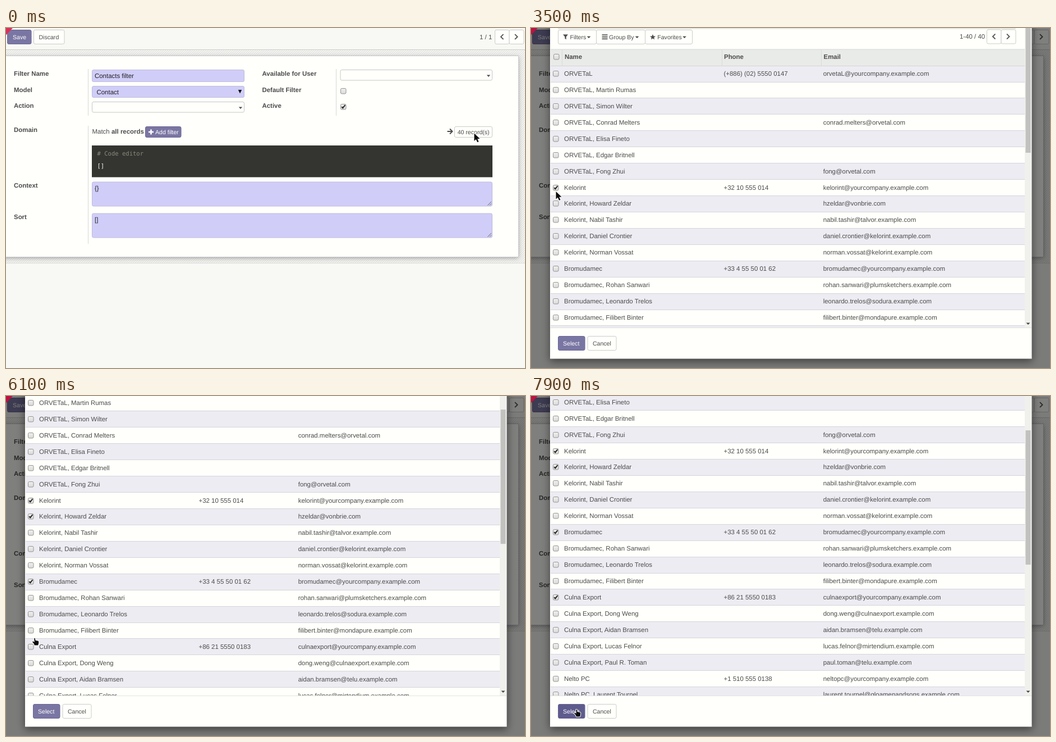
These frames come from a looping animation (925x605 px, 8000 ms). An HTML page with a canvas:

```html
<!DOCTYPE html>
<html lang="en">
<head>
<meta charset="utf-8">
<title>Contact filter</title>
<style>
html, body { margin: 0; width: 925px; height: 605px; overflow: hidden; background: #f8f8f5; }
canvas { display: block; }
</style>
</head>
<body>
<canvas id="stage" width="925" height="605"></canvas>
<script>
const g = document.getElementById('stage').getContext('2d');
const LOOP = 8000, STEP = 100, ROW = 28.93;
const SANS = '"Liberation Sans", Arial, sans-serif';
const MONO = '"DejaVu Sans Mono", monospace';
const INK = '#4c4c4c', PAPER = '#fffffb', PURPLE = '#7a76a3', LILAC = '#d0cdf8';

// name, email, phone
const rows = [
  ['ORVETaL', 'orvetaL@yourcompany', '(+886) (02) 5550 0147'],
  ['ORVETaL, Martin Rumas'],
  ['ORVETaL, Simon Wilter'],
  ['ORVETaL, Conrad Melters', 'conrad.melters@orvetal.com'],
  ['ORVETaL, Elisa Fineto'],
  ['ORVETaL, Edgar Britnell'],
  ['ORVETaL, Fong Zhui', 'fong@orvetal.com'],
  ['Kelorint', 'kelorint@yourcompany', '+32 10 555 014'],
  ['Kelorint, Howard Zeldar', 'hzeldar@vonbrie.com'],
  ['Kelorint, Nabil Tashir', 'nabil.tashir@talvor'],
  ['Kelorint, Daniel Crontier', 'daniel.crontier@kelorint'],
  ['Kelorint, Norman Vossat', 'norman.vossat@kelorint'],
  ['Bromudamec', 'bromudamec@yourcompany', '+33 4 55 50 01 62'],
  ['Bromudamec, Rohan Sanwari', 'rohan.sanwari@plumsketchers'],
  ['Bromudamec, Leonardo Trelos', 'leonardo.trelos@sodura'],
  ['Bromudamec, Filibert Binter', 'filibert.binter@mondapure'],
  ['Culna Export', 'culnaexport@yourcompany', '+86 21 5550 0183'],
  ['Culna Export, Dong Weng', 'dong.weng@culnaexport'],
  ['Culna Export, Aidan Bramsen', 'aidan.bramsen@telu'],
  ['Culna Export, Lucas Felnor', 'lucas.felnor@mirtendium'],
  ['Culna Export, Paul R. Toman', 'paul.toman@telu'],
  ['Nelto PC', 'neltopc@yourcompany', '+1 510 555 0138'],
  ['Nelto PC, Laurent Tournel', 'laurent.tournel@gloamenandsons']
];
const ticks = { 7: 3300, 8: 4300, 12: 5200, 16: 7300 };

// time, then value(s)
const scrollKeys = [[5800, 0], [5900, 17], [6000, 57], [6100, 98], [6300, 179], [6400, 184], [6600, 186]];
const mouseKeys = [
  [1600, 834, 187], [1900, 480, 262], [2100, 62, 300], [2200, 52, 290], [2300, 52, 290],
  [2600, 50, 288], [2900, 47, 287], [3200, 46, 283], [3400, 46, 283], [3600, 42, 298],
  [3800, 39, 315], [4000, 39, 315], [4100, 41, 315], [4400, 41, 315], [4700, 44, 380],
  [4900, 45, 429], [5400, 45, 428], [5500, 48, 429], [5800, 50, 430], [6100, 50, 430],
  [6300, 46, 425], [6600, 43, 400], [6700, 43, 400], [6900, 43, 358], [7300, 43, 358],
  [7800, 78, 551], [7900, 80, 557]
];

function track(keys, t, i = 1) {
  if (t <= keys[0][0]) return keys[0][i];
  for (let k = 1; k < keys.length; k++) {
    const a = keys[k - 1], b = keys[k];
    if (t <= b[0]) return a[i] + (b[i] - a[i]) * (t - a[0]) / (b[0] - a[0]);
  }
  return keys[keys.length - 1][i];
}

function rect(x, y, w, h, fill) {
  g.fillStyle = fill;
  g.fillRect(x, y, w, h);
}

function box(x, y, w, h, fill, line, r = 2.5) {
  g.beginPath();
  g.roundRect(x + .5, y + .5, w - 1, h - 1, r);
  g.fillStyle = fill;
  g.fill();
  g.strokeStyle = line;
  g.lineWidth = 1;
  g.stroke();
}

function text(s, x, y, { color = INK, size = 11.44, bold = false, font = SANS } = {}) {
  g.font = `${bold ? 'bold ' : ''}${size}px ${font}`;
  g.fillStyle = color;
  g.fillText(s, x, y);
}
const bold = (s, x, y) => text(s, x, y, { bold: true });
const small = (s, x, y, color = INK) => text(s, x, y, { size: 10.56, color });

function poly(points, x, y, fill, line) {
  g.beginPath();
  points.forEach(([a, b], i) => i ? g.lineTo(x + a, y + b) : g.moveTo(x + a, y + b));
  g.closePath();
  if (line) {
    g.strokeStyle = line;
    g.lineWidth = 2;
    g.lineJoin = 'round';
    g.stroke();
  }
  g.fillStyle = fill;
  g.fill();
}

function stroke(points, color, width) {
  g.beginPath();
  points.forEach(([a, b], i) => i ? g.lineTo(a, b) : g.moveTo(a, b));
  g.strokeStyle = color;
  g.lineWidth = width;
  g.lineJoin = 'miter';
  g.stroke();
}

const caret = (x, y, w = 3.3, h = 3.5, color = INK) => poly([[-w, 0], [w, 0], [0, h]], x, y, color);

function check(x, y, on) {
  const shade = g.createLinearGradient(0, y - 5, 0, y + 5);
  shade.addColorStop(0, '#f1f1ef');
  shade.addColorStop(1, '#dadad8');
  box(x - 5, y - 5, 10.5, 10.5, shade, '#949494', 2);
  if (on) stroke([[x - 2.7, y + .2], [x - .8, y + 2.4], [x + 3.5, y - 3]], '#222', 2);
}

function pager(x, y) {
  box(x, y, 26.5, 26, PAPER, '#cbcbc9');
  box(x + 25.5, y, 27, 26, PAPER, '#cbcbc9');
  const mid = y + 12.7;
  stroke([[x + 15.5, mid - 4.5], [x + 11, mid], [x + 15.5, mid + 4.5]], '#555', 1.9);
  stroke([[x + 36, mid - 4.5], [x + 40.5, mid], [x + 36, mid + 4.5]], '#555', 1.9);
}

const tile = document.createElement('canvas');
tile.width = tile.height = 4;
const tg = tile.getContext('2d');
tg.fillStyle = '#f3f3f0';
tg.fillRect(0, 0, 4, 4);
tg.fillStyle = '#dededc';
for (let i = 0; i < 4; i++) tg.fillRect(i, 3 - i, 1, 1);
const hatch = g.createPattern(tile, 'repeat');

function area(y, s) {
  box(153, y, 714, 44, LILAC, '#bfbcdc');
  text(s, 158, y + 15, { color: '#222' });
  stroke([[858.5, y + 42], [865, y + 35.5]], '#666', 1);
  stroke([[862, y + 42], [865, y + 39]], '#666', 1);
}

function form(t) {
  rect(0, 0, 925, 605, '#f8f8f5');
  rect(0, 39, 925, 379, hatch);
  rect(0, 38, 925, 1, '#cdcdcd');
  g.setLineDash([1, 1]);
  stroke([[0, 418.5], [925, 418.5]], '#c4c4c4', 1);
  g.setLineDash([]);
  g.save();
  g.shadowColor = 'rgba(0,0,0,.35)';
  g.shadowBlur = 8;
  g.shadowOffsetY = 2;
  rect(-10, 50, 923, 357, PAPER);
  g.restore();
  g.strokeStyle = '#c8c8d0';
  g.lineWidth = 1;
  g.strokeRect(-10.5, 49.5, 924, 358);

  box(2, 3, 43.5, 26, PURPLE, '#6a6696');
  small('Save', 12, 19.7, '#fff');
  box(49, 3, 55.5, 26, PAPER, '#cbcbc9');
  small('Discard', 58.5, 19.7);
  text('1 / 1', 844, 19.7);
  pager(871, 3);

  [['Filter Name', 14, 84.5], ['Model', 14, 113.5], ['Action', 14, 141.5], ['Domain', 14, 185.3],
   ['Context', 14, 283.5], ['Sort', 14, 339.5], ['Available for User', 456.5, 84.5],
   ['Default Filter', 456.5, 113.5], ['Active', 456.5, 141.5]].forEach(a => bold(...a));
  rect(146, 73, 1, 83, '#d6d6d4');
  rect(146, 174, 1, 210, '#d6d6d4');
  rect(588, 73, 1, 83, '#d6d6d4');

  box(153, 74, 272, 22, LILAC, '#bfbcdc');
  text('Contacts filter', 158, 88.7, { color: '#222' });
  box(153, 103, 272, 21, LILAC, '#bfbcdc');
  text('Contact', 161.5, 117.7, { color: '#222' });
  caret(417, 110, 3.2, 6.5, '#111');
  box(153, 131, 272, 19.5, PAPER, '#c6c6c4');
  caret(418, 140.5);
  box(595.5, 74, 271.5, 19.5, PAPER, '#c6c6c4');
  caret(860, 83.5);
  check(601, 112, false);
  check(601, 140, true);

  text('Match ', 153.5, 188);
  bold('all records', 188, 188);
  box(248, 175, 64.5, 20, PURPLE, '#6a6696');
  rect(254, 183.7, 9, 2.6, '#fff');
  rect(257.2, 180.5, 2.6, 9, '#fff');
  small('Add filter', 266, 188.7, '#fff');
  stroke([[786.5, 184], [795, 184]], INK, 2);
  stroke([[791, 179.5], [795.5, 184], [791, 188.5]], INK, 2);
  const down = t >= 500 && t < 1100, over = t >= 100;
  box(799, 175, 68, 20, down ? '#d6d6d4' : over ? '#e6e6e3' : PAPER,
      down ? '#8f8f8f' : over ? '#adadab' : '#cbcbc9');
  small('40 record(s)', 804.7, 188.7);

  rect(153, 209, 714, 56.5, '#343530');
  text('# Code editor', 162.5, 227.3, { size: 10.56, font: MONO, color: '#8c8b7e' });
  text('[]', 162.5, 249.3, { size: 10.56, font: MONO, color: '#f8f8f2' });
  area(273.5, '{}');
  area(329.5, '[]');
}

function searchBar() {
  rect(48, .5, 816, 1, '#d0d0ce');
  box(48, 3, 69, 26, PAPER, '#cbcbc9');
  box(116, 3, 88, 26, PAPER, '#cbcbc9');
  box(203, 3, 85, 26, PAPER, '#cbcbc9');
  poly([[-4.5, -4.5], [4.5, -4.5], [1.2, -.5], [1.2, 4.5], [-1.2, 2.5], [-1.2, -.5]], 61.5, 16, INK);
  for (let i = 0; i < 3; i++) rect(126.5, 11.5 + i * 3.5, 10, 1.7, INK);
  const star = [...Array(10)].map((_, i) => {
    const a = i * Math.PI / 5, r = i % 2 ? 2.3 : 5.3;
    return [r * Math.sin(a), -r * Math.cos(a)];
  });
  poly(star, 217, 16.3, INK);
  small('Filters', 69.5, 19.7);
  small('Group By', 139, 19.7);
  small('Favorites', 225.3, 19.7);
  [103, 189, 273.5].forEach(x => caret(x, 14.7));
  text('1-40 / 40', 764, 19.2);
  pager(812, 2.5);
}

function list(t, scroll) {
  g.save();
  g.beginPath();
  g.rect(34, 0, 846, 533);
  g.clip();
  g.translate(0, -Math.round(scroll));
  searchBar();
  rect(35, 38, 845, 29, '#e9ebe8');
  rect(35, 37.5, 845, 1, '#d8d8d8');
  [55, 340, 517].forEach(x => rect(x, 38, 1, 29, '#d9dad8'));
  check(45, 51, false);
  bold('Name', 60, 55.3);
  bold('Phone', 344, 55.3);
  bold('Email', 521.5, 55.3);
  rows.forEach(([name, email = '', phone = ''], i) => {
    const top = Math.round(66.6 + i * ROW), next = Math.round(66.6 + (i + 1) * ROW);
    rect(35, top, 845, next - top, i % 2 ? PAPER : '#edecf2');
    rect(35, top, 845, 1, '#d5d5db');
    const mid = Math.round(81 + i * ROW);
    check(44, mid, t >= ticks[i]);
    text(name, 59, mid + 4.2);
    text(phone, 343.5, mid + 4.2);
    if (email) text(email.endsWith('.com') ? email : email + '.example.com', 520.7, mid + 4.2);
  });
  g.restore();

  rect(880, 0, 11.5, 533, '#f0f0ed');
  rect(881.5, -17 + .42 * scroll, 9, 239, '#c1c1bf');
  caret(886, 524.5, 3.5, 3.5, '#444');
}

function dialog(t, mouse) {
  rect(0, 0, 925, 605, 'rgba(0,0,0,.5)');
  g.save();
  g.shadowColor = 'rgba(0,0,0,.5)';
  g.shadowBlur = 14;
  g.shadowOffsetY = 4;
  rect(34, -20, 858.5, 608.5, PAPER);
  g.restore();
  list(t, track(scrollKeys, t));
  rect(34, 533, 858, 1, '#e2e2e0');
  const ready = t >= ticks[7];
  const fill = !ready ? '#a8a5c1' : overSelect(mouse) ? '#5e5b8d' : PURPLE;
  box(48, 548, 48.5, 26, fill, !ready ? '#a19ebc' : '#6a6696');
  small('Select', 57, 564.8, '#fff');
  box(100.5, 548, 52, 26, PAPER, '#cbcbc9');
  small('Cancel', 110, 564.8);
}

const overSelect = ([x, y]) => x >= 48 && x <= 96 && y >= 548 && y <= 574;

const ARROW = [[0, 0], [0, 13.5], [3.2, 10.6], [5.6, 15.8], [8, 14.7], [5.7, 9.8], [10, 9.6]];
const HAND = [[-.8, .6], [.8, .6], [1.5, 4.5], [6, 5.2], [7.3, 6.6], [7, 10.5], [6, 13], [-.2, 13],
  [-1.4, 10], [-4, 7.2], [-3, 6], [-.3, 7.5]];

function pointer(t, mouse) {
  const [x, y] = mouse;
  const hand = t >= 100 && (t < 1300 || (x > 49 && y < 533) || overSelect(mouse));
  poly(hand ? HAND : ARROW, hand ? x + 1 : x + .5, y + .5, '#0a0a0a', '#fff');
}

function draw(now) {
  const t = Math.floor(now % LOOP / STEP) * STEP;
  const mouse = [track(mouseKeys, t), track(mouseKeys, t, 2)];
  g.textRendering = 'geometricPrecision';
  form(t);
  if (t >= 1300) dialog(t, mouse);
  poly([[0, 0], [12, 0], [0, 12.5]], 0, 0, t < 1300 ? '#dc2f58' : '#bd1240');
  pointer(t, mouse);
}

let start;
function tick(now) {
  start ??= now;
  draw(now - start);
  requestAnimationFrame(tick);
}
draw(0);
requestAnimationFrame(tick);
</script>
</body>
</html>
```
